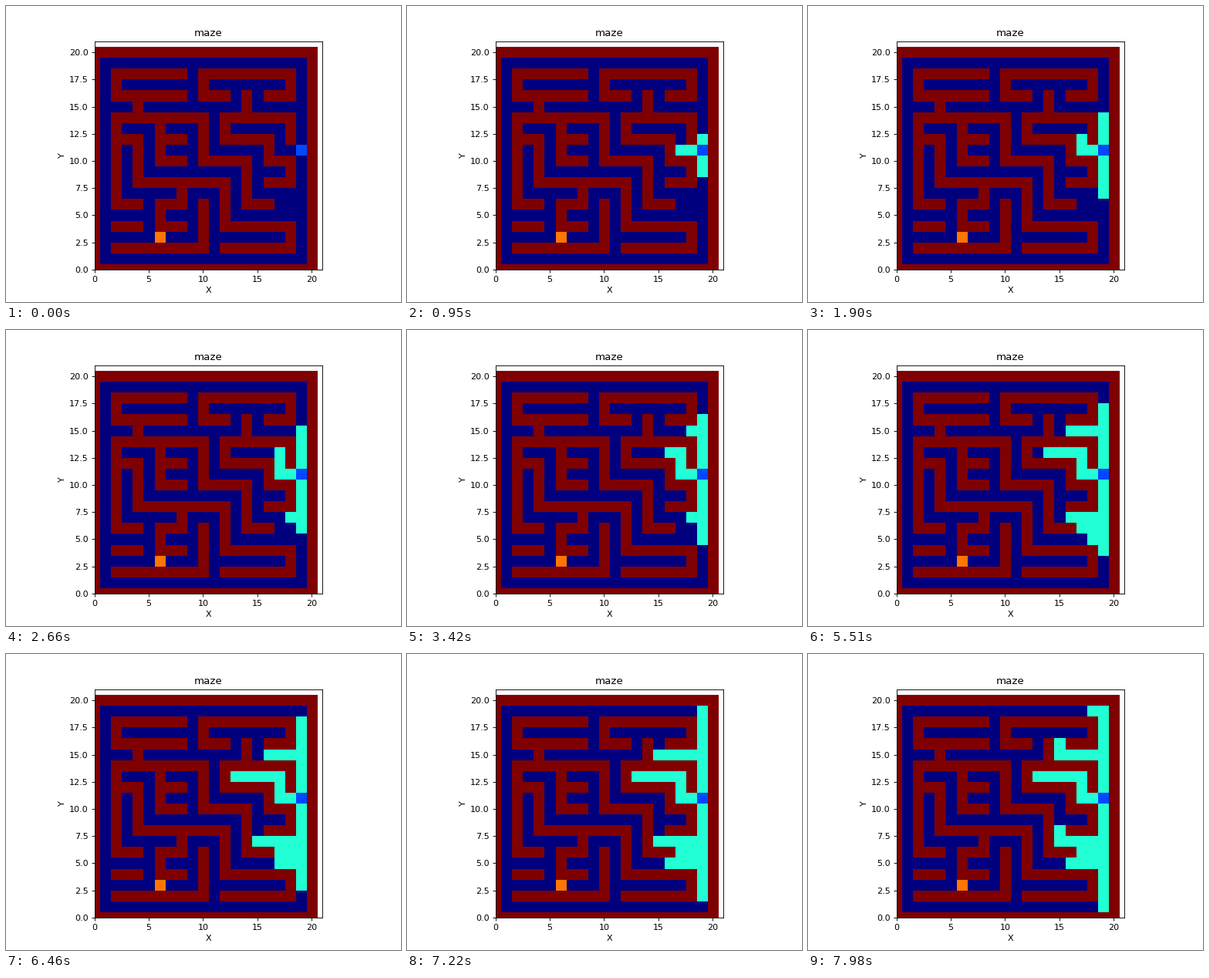
Animation of 512x384 px, one loop 8000 ms. Source, as a matplotlib script:

```python
from collections import deque

import matplotlib.pyplot as plt
import numpy as np
from matplotlib.animation import FuncAnimation

SIZE = 21
START, GOAL = (19, 11), (6, 3)
STEP_MS, LOOP_MS, TICK_MS = 190, 8000, 20

# Cell values on the 8-bit colour scale
FREE, BEGIN, SEEN, END, WALL = 0, 50, 100, 200, 255

MOVES = {"N": (0, 1), "S": (0, -1), "E": (1, 0), "W": (-1, 0)}
SEARCH = "SWNE"

# Each wall grows from a pillar, two cells per move
WALLS = {
    (8, 18): "WWWSEEE",
    (12, 16): "WNEEEESW",
    (4, 16): "S",
    (14, 16): "S",
    (4, 6): "WNNNNEEEESSEESSE",
    (6, 14): "SSE",
    (6, 12): "E",
    (2, 12): "ESSEEEESSEEESWWW",
    (8, 8): "SWSE",
    (18, 12): "NWWWSEESESW",
    (2, 4): "E",
    (2, 2): "EEEENN",
}


def build_maze():
    grid = np.full((SIZE, SIZE), WALL)
    grid[1:-1, 1:-1] = FREE
    for (x, y), path in WALLS.items():
        grid[y, x] = WALL
        for move in path:
            dx, dy = MOVES[move]
            for _ in range(2):
                x, y = x + dx, y + dy
                grid[y, x] = WALL
    grid[START[::-1]] = BEGIN
    grid[GOAL[::-1]] = END
    return grid


def search_order(grid):
    """Cells in the order a breadth-first search reaches them."""
    order, queue, seen = [], deque([START]), {START}
    while queue:
        x, y = queue.popleft()
        for move in SEARCH:
            dx, dy = MOVES[move]
            cell = x + dx, y + dy
            if cell in seen or grid[cell[::-1]] == WALL:
                continue
            if cell == GOAL:
                return order
            seen.add(cell)
            order.append(cell)
            queue.append(cell)
    return order


maze = build_maze()
order = search_order(maze)

plt.rcParams["text.kerning_factor"] = 6
fig, ax = plt.subplots(figsize=(6.4, 4.8), dpi=80)
image = ax.imshow(maze, cmap="jet", vmin=FREE, vmax=WALL, origin="lower",
                  interpolation="nearest")
ax.set(xlim=(0, SIZE), ylim=(0, SIZE), xlabel="X", ylabel="Y", title="maze")


def update(tick):
    steps = (tick * TICK_MS + TICK_MS // 2) // STEP_MS
    grid = maze.copy()
    for x, y in order[:steps]:
        grid[y, x] = SEEN
    image.set_data(grid)
    return [image]


anim = FuncAnimation(fig, update, frames=LOOP_MS // TICK_MS, interval=TICK_MS,
                     repeat=True, repeat_delay=0)
plt.show()
```
